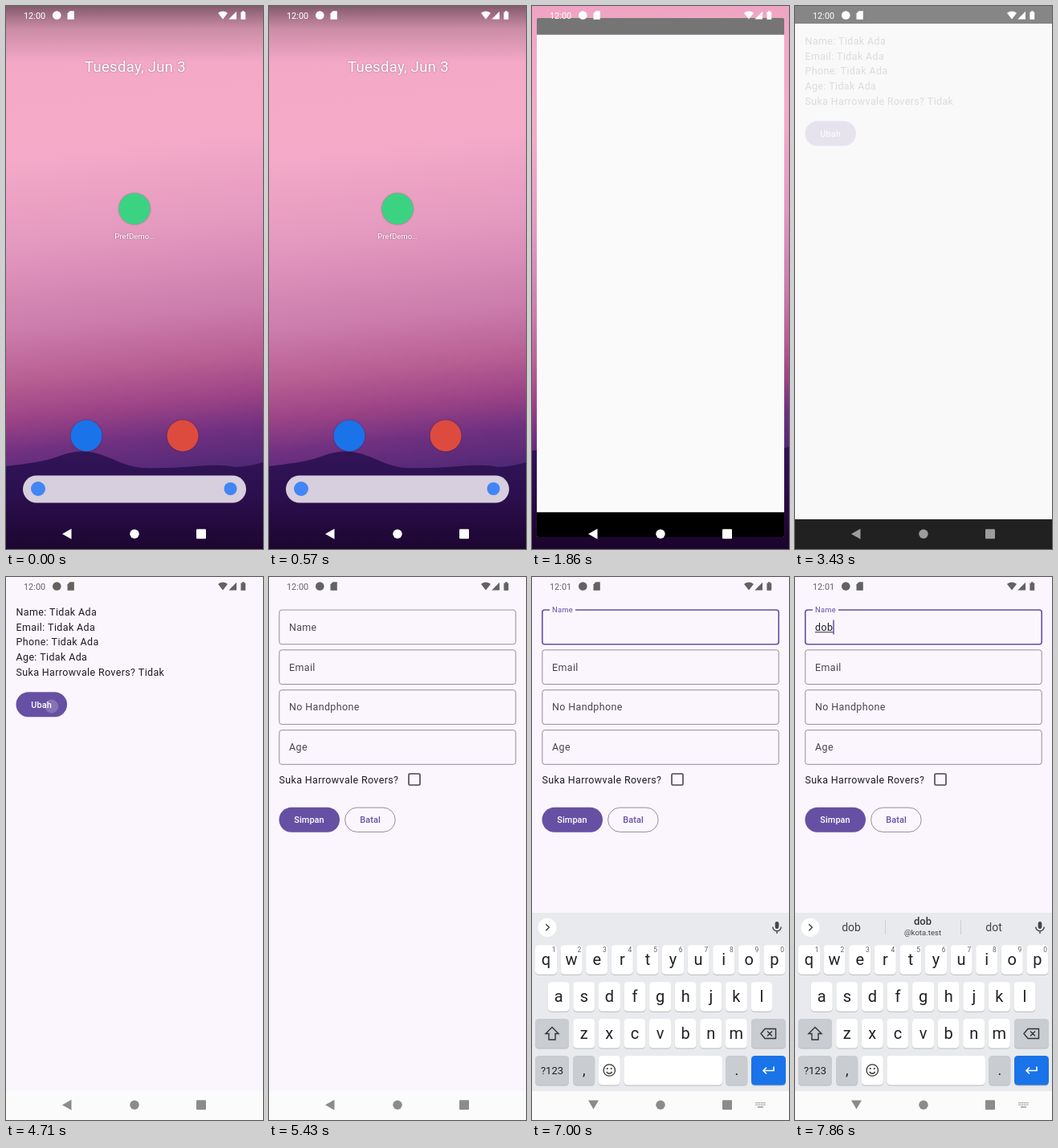
Animation, 320 px wide and 676 px high, one loop 8000 ms. Source, as an HTML page with a canvas:

```html
<!DOCTYPE html>
<html lang="id">
<head>
<meta charset="utf-8">
<style>
html, body { margin: 0; width: 100%; height: 100%; overflow: hidden; background: #fbf6fe; }
canvas { display: block; width: 320px; height: 676px; }
</style>
</head>
<body>
<canvas id="stage"></canvas>
<script>
const W = 320, H = 676, LOOP = 8000, DP = 0.7786;
const PURPLE = '#6650a4', INK = '#1d1b20', MUTED = '#49454f', KEY_GREY = '#c9ccd1';
const TIME = {
  open: 1567, openFor: 450, appFade: 3400, press: 4590, form: 4950,
  focus: 6250, keyboard: 6560, minute: 7000, keys: [7150, 7430, 7720]
};
const TYPED = 'dob';

const canvas = document.getElementById('stage');
const ctx = canvas.getContext('2d');
const dpr = window.devicePixelRatio || 1;
canvas.width = W * dpr;
canvas.height = H * dpr;

const clamp = v => Math.max(0, Math.min(1, v));
const mix = (a, b, p) => a + (b - a) * p;
const progress = (t, start, length) => clamp((t - start) / length);
const easeOut = (p, power = 3) => 1 - (1 - p) ** power;
const grey = v => `rgb(${v},${v},${v})`;

function rect(x, y, w, h, color, r = 0) {
  ctx.fillStyle = color;
  ctx.beginPath();
  ctx.roundRect(x, y, w, h, r);
  ctx.fill();
}

function outline(x, y, w, h, color, r, width) {
  ctx.strokeStyle = color;
  ctx.lineWidth = width;
  ctx.beginPath();
  ctx.roundRect(x, y, w, h, r);
  ctx.stroke();
}

function disc(x, y, r, color) {
  ctx.fillStyle = color;
  ctx.beginPath();
  ctx.arc(x, y, r, 0, 7);
  ctx.fill();
}

function shape(d, color) {
  ctx.fillStyle = color;
  ctx.fill(new Path2D(d));
}

function line(d, color, width) {
  ctx.strokeStyle = color;
  ctx.lineWidth = width;
  ctx.stroke(new Path2D(d));
}

function text(str, x, y, size, color, { align = 'left', weight = 400, spacing = 0 } = {}) {
  ctx.font = `${weight} ${size}px Roboto, sans-serif`;
  ctx.letterSpacing = spacing + 'px';
  ctx.textAlign = align;
  ctx.fillStyle = color;
  ctx.fillText(str, x, y);
}

const body = (str, x, y, color = INK) => text(str, x, y, 16 * DP, color, { spacing: 0.5 * DP });
const buttonText = (str, x, y, color) =>
  text(str, x, y, 14 * DP, color, { align: 'center', weight: 500, spacing: 0.1 });

function gradient(x0, y0, x1, y1, stops) {
  const g = ctx.createLinearGradient(x0, y0, x1, y1);
  stops.forEach(([at, color]) => g.addColorStop(at, color));
  return g;
}

function drawWallpaper(p) {
  ctx.save();
  ctx.translate(0, -20 * p);
  rect(0, 0, W, H + 20, gradient(0, 0, 65, 600, [
    [0, '#f2a6c5'], [0.3, '#f5abc8'], [0.5, '#e398bf'], [0.67, '#cb7cab'],
    [0.77, '#b85f94'], [0.85, '#9c4386'], [0.92, '#6f3080'], [1, '#4f2875']
  ]));
  shape('M0 573C25 570 50 567 70 559Q98 549 125 561C145 569 155 574 170 575Q200 576 235 573T285 574Q305 573 320 568V700H0Z',
    gradient(0, 553, 0, H, [[0, '#321558'], [0.5, '#2b0e4c'], [1, '#1c0630']]));
  ctx.restore();
  ctx.globalAlpha = 1 - p;
  rect(0, 0, W, 70, gradient(0, 0, 0, 70, [[0, 'rgba(40,30,35,.55)'], [0.4, 'rgba(40,30,35,.2)'], [1, 'rgba(40,30,35,0)']]));
  ctx.globalAlpha = 1;
}

function drawHome(t) {
  const p = easeOut(progress(t, TIME.open, TIME.openFor));
  drawWallpaper(p);
  ctx.globalAlpha = 1 - clamp(p * 1.5);
  ctx.shadowColor = 'rgba(0,0,0,.4)';
  ctx.shadowBlur = 2 * dpr;
  text('Tuesday, Jun 3', 161, 82, 18.4, '#fff', { align: 'center', spacing: 0.35 });
  text('PrefDemo…', 160, 289.5, 9.6, '#fff', { align: 'center' });
  disc(160, 252.5, 19.5, '#3bd381');
  disc(100, 535, 19.5, '#1a73e8');
  disc(220, 535, 19.5, '#dd4b3e');
  ctx.shadowBlur = 0;
  ctx.shadowColor = 'transparent';
  rect(21, 584.5, 278, 34, '#d7cede', 17);
  disc(40, 601, 9, '#4285f4');
  disc(279.5, 601, 8, '#4285f4');
  ctx.globalAlpha = 1;
}

function drawSplash() {
  rect(0, 0, W, H, '#fafafa');
  rect(0, 0, W, 22, '#757575');
  rect(0, 639, W, 37, '#000');
}

// The window grows out of the app icon towards the screen centre.
function drawOpening(t) {
  const p = progress(t, TIME.open, TIME.openFor);
  const scale = mix(0.125, 1, easeOut(p));
  const height = mix(W, H, easeOut(p, 4));
  const centre = mix(252, 338, easeOut(p, 6));
  ctx.save();
  ctx.globalAlpha = clamp(p * 6);
  ctx.translate(160 - 160 * scale, centre - height * scale / 2);
  ctx.scale(scale, scale);
  ctx.beginPath();
  ctx.roundRect(0, 0, W, height, mix(160, 0, easeOut(p)) * 0.4);
  ctx.clip();
  drawSplash();
  ctx.restore();
}

function drawProfile(t) {
  ['Name: Tidak Ada', 'Email: Tidak Ada', 'Phone: Tidak Ada', 'Age: Tidak Ada', 'Suka Harrowvale Rovers? Tidak']
    .forEach((row, i) => body(row, 12.5, 48 + i * 24 * DP));
  rect(12.5, 143.3, 63.5, 31, PURPLE, 15.5);
  const p = progress(t, TIME.press, 400);
  if (p > 0) {
    ctx.save();
    ctx.beginPath();
    ctx.roundRect(12.5, 143.3, 63.5, 31, 15.5);
    ctx.clip();
    disc(mix(58, 44, p * p), 161, mix(2, 36, p ** 1.4), 'rgba(255,255,255,.2)');
    ctx.restore();
  }
  buttonText('Ubah', 44, 162.7, '#fff');
}

function drawNameField(t) {
  const p = easeOut(progress(t, TIME.focus, 150));
  const focused = p > 0;
  outline(12.8, 41, 294.4, 42.7, focused ? PURPLE : '#79747e', 3, focused ? 1.6 : 0.8);
  if (focused) rect(25 - 3 * p, 39, 32 * p, 4, '#fbf6fe');
  text('Name', 25, mix(66.5, 43.8, p), mix(16, 12, p) * DP, focused ? PURPLE : MUTED, { spacing: 0.4 * DP });
  if (!focused) return;

  const value = TYPED.slice(0, TIME.keys.filter(k => t >= k).length);
  body(value, 25, 66.5);
  const width = ctx.measureText(value).width;
  if (value) rect(25, 68.3, width, 0.9, INK);
  const lastInput = [TIME.focus, ...TIME.keys].filter(k => t >= k).pop();
  if ((t - lastInput) % 1000 < 500) rect(25 + width, 53.5, 1.5, 18, PURPLE);
}

function drawForm(t) {
  drawNameField(t);
  ['Email', 'No Handphone', 'Age'].forEach((label, i) => {
    const y = 90.8 + i * 49.9;
    outline(12.8, y, 294.4, 42.7, '#79747e', 3, 0.8);
    body(label, 25, y + 25.7, MUTED);
  });
  body('Suka Harrowvale Rovers?', 12.5, 256.5);
  outline(174, 245, 14, 14, MUTED, 1.3, 1.6);
  rect(12.5, 286.7, 75.5, 31, PURPLE, 15.5);
  buttonText('Simpan', 50, 306, '#fff');
  outline(94.6, 287.1, 62.6, 30.3, '#79747e', 15.2, 0.8);
  buttonText('Batal', 126, 306, PURPLE);
}

function key(x, y, w, label, color = '#fff', size = 20) {
  rect(x, y + 1, w, 36.5, '#b9bcc1', 4.5);
  rect(x, y, w, 36.5, color, 4.5);
  if (label) text(label, x + w / 2, y + 18.5 + size * 0.32, size, '#202124', { align: 'center' });
}

function drawSuggestions(t) {
  disc(19, 436.3, 11.5, '#fff');
  line('M17.3 432.3l4 4-4 4', '#444', 1.5);
  rect(302.7, 429, 4.6, 9, '#444', 2.3);
  line('M299.8 435.5a5.2 5.2 0 0 0 10.4 0M305 440.5v3.5', '#444', 1.4);
  const typed = TYPED.slice(0, TIME.keys.filter(k => t >= k).length);
  if (!typed) return;
  const centred = { align: 'center' };
  rect(112, 427, 0.8, 18, '#c4c7cc');
  rect(206, 427, 0.8, 18, '#c4c7cc');
  text(typed, 70, 441, 14, '#444', centred);
  text(typed, 159, 432.5, 13, '#333', { align: 'center', weight: 500 });
  text('@kota.test', 159, 445.5, 9.6, '#444', centred);
  text('dot', 247.5, 441, 14, '#444', centred);
}

function drawKeyboard(t) {
  const hidden = 1 - easeOut(progress(t, TIME.keyboard, 240));
  ctx.save();
  ctx.beginPath();
  ctx.rect(0, 0, W, 640);
  ctx.clip();
  ctx.translate(0, 222 * hidden);
  rect(0, 418, W, 222, '#e8eaed');
  drawSuggestions(t);
  [['qwertyuiop', 4], ['asdfghjkl', 19.7], ['zxcvbnm', 51.2]].forEach(([letters, left], row) =>
    [...letters].forEach((letter, i) => {
      const x = left + i * 31.6, y = 458.3 + row * 45.9;
      key(x, y, 27, letter);
      if (row === 0) text((i + 1) % 10, x + 23.2, y + 9, 8.5, '#5f6368', { align: 'center' });
    }));

  key(4, 550, 42, '', KEY_GREY);
  line('M25 560.5l-8 8h4v7.5h8v-7.5h4z', '#333', 1.4);
  key(273, 550, 43, '', KEY_GREY);
  line('M285 568.5l5-6h13.500v12h-13.500zM293 565.500l6 6m0-6l-6 6', '#333', 1.4);

  key(4, 596, 42, '?123', KEY_GREY, 13);
  key(51.2, 596, 27, ',', KEY_GREY, 18);
  key(82.8, 596, 27, '');
  line('M103.500 614a7.200 7.200 0 1 0-14.400 0a7.200 7.200 0 1 0 14.400 0M92.800 616q3.500 4.500 7 0', '#333', 1.3);
  disc(93.8, 612, 1.1, '#333');
  disc(98.8, 612, 1.1, '#333');
  key(114.400, 596, 122.500, '');
  key(241.300, 596, 27, '.', KEY_GREY, 18);
  key(273, 596, 43, '', '#1a73e8');
  line('M301 609.500v5h-13m4-4l-4 4 4 4', '#fff', 1.6);
  ctx.restore();
}

function drawStatusBar(t) {
  const color = grey(Math.round(mix(255, 98, progress(t, 3440, 200))));
  text(t < TIME.minute ? '12:00' : '12:01', 22, 15.7, 10.9, color);
  disc(63.3, 11.5, 5.3, color);
  shape('M79.500 6.200h5.300v10.600h-8.300v-7.600z', color);
  shape('M264 8.800Q270 4.300 276 8.800L270 16.500z', color);
  shape('M287 6.800v9.700h-9.700z', color);
  shape('M294 6.300h2.600v1.200h1.600v9.300h-5.800v-9.300h1.600z', color);
}

function drawNavBar(t) {
  const color = grey(Math.round(mix(255, 139, progress(t, 3330, 120))));
  const back = t >= TIME.keyboard ? 'M70 651.500h13l-6.500 11z' : 'M70 657.300l11.500-6.500v13z';
  shape(back, color);
  disc(160, 657.2, 5.7, color);
  rect(237, 651.3, 12, 12, color, 1);
  if (t < TIME.focus + 50) return;
  for (let i = 0; i < 12; i++) rect(278.300 + i % 6 * 2.200, 654 + Math.floor(i / 6) * 2.500, 1.300, 1.300, color);
  rect(281, 659.200, 7, 1.300, color);
}

function drawApp(t) {
  rect(0, 0, W, H, '#fbf6fe');
  rect(0, 640, W, 36, '#fcfbfc');
  if (t < TIME.form) drawProfile(t);
  else drawForm(t);
  if (t >= TIME.keyboard) drawKeyboard(t);
}

function frame(now) {
  const t = now % LOOP;
  ctx.setTransform(dpr, 0, 0, dpr, 0, 0);
  if (t < TIME.appFade) {
    drawHome(t);
    if (t >= TIME.open) drawOpening(t);
  } else {
    drawApp(t);
    ctx.globalAlpha = 1 - progress(t, TIME.appFade, 230);
    if (ctx.globalAlpha > 0) drawSplash();
    ctx.globalAlpha = 1;
  }
  drawStatusBar(t);
  drawNavBar(t);
  requestAnimationFrame(frame);
}
requestAnimationFrame(frame);
</script>
</body>
</html>
```
